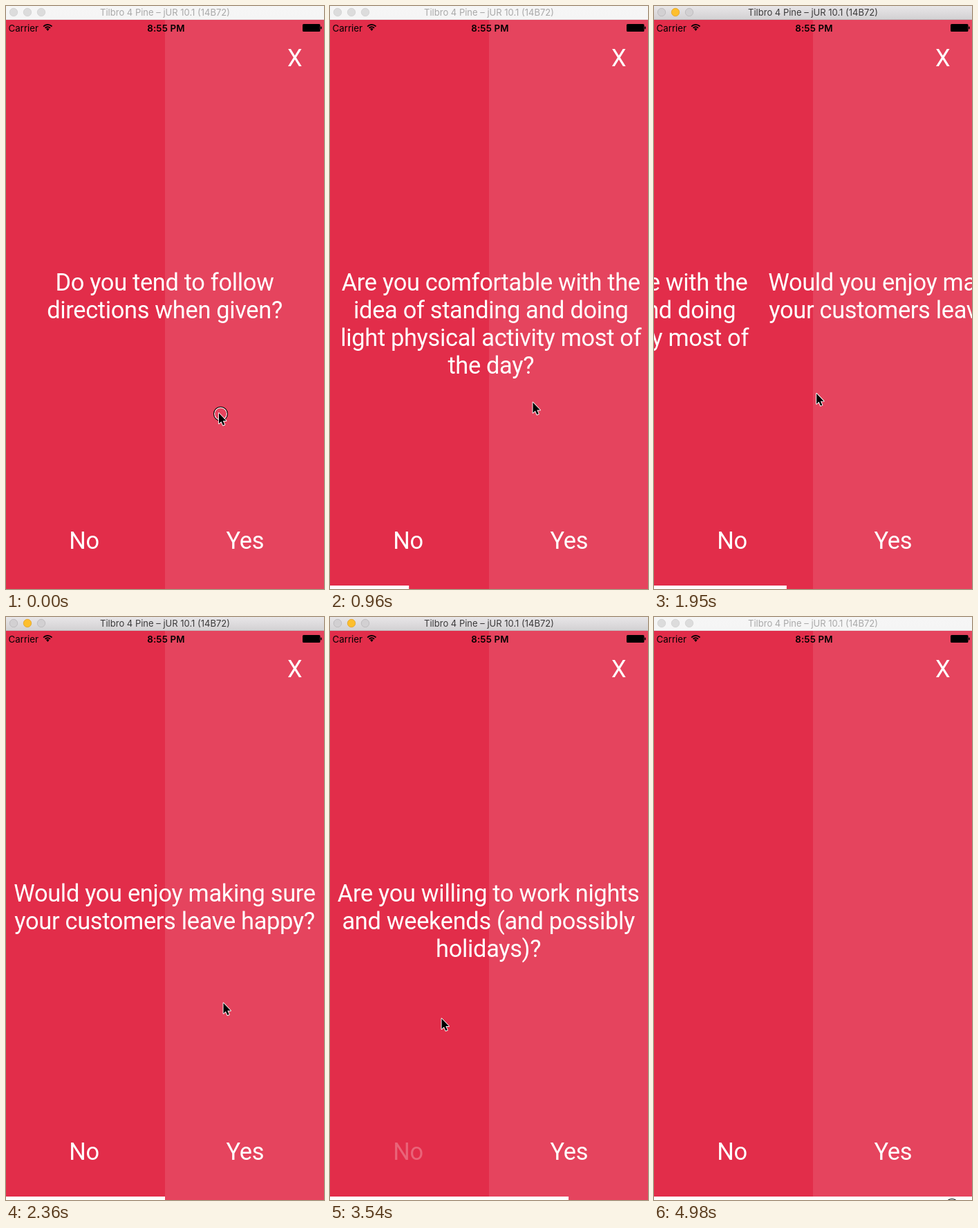
Animation, 460 px wide and 842 px high, one loop 5080 ms. Source, as an HTML page with a canvas:

```html
<!DOCTYPE html>
<html lang="en">
<head>
<meta charset="utf-8">
<title>Questionnaire</title>
<style>
html, body { margin: 0; width: 100%; height: 100%; overflow: hidden; }
canvas { display: block; }
</style>
</head>
<body>
<canvas id="stage" width="460" height="842"></canvas>
<script>
const ctx = document.getElementById('stage').getContext('2d');
const W = 460, H = 842, LOOP = 5080;
const BIG = '34.4px Roboto, sans-serif';
const PITCH = 464, SLIDE = 500;

const questions = [
  ['Do you tend to follow', 'directions when given?'],
  ['Are you comfortable with the', 'idea of standing and doing', 'light physical activity most of', 'the day?'],
  ['Would you enjoy making sure', 'your customers leave happy?'],
  ['Are you willing to work nights', 'and weekends (and possibly', 'holidays)?']
];

// Each answer: button, touch down, touch up (the slide starts on release).
const taps = [
  { label: 'Yes', down: 412, up: 490 },
  { label: 'No', down: 1530, up: 1650 },
  { label: 'Yes', down: 2600, up: 2600 },
  { label: 'No', down: 3530, up: 3530 }
];

const ACTIVE = [1530, 4980];
const rings = [[0, 60], [412, 510], [1530, 1645], [4980, LOOP]];

// Pointer path: time, x, y.
const path = [
  [0, 308, 588], [60, 308, 588], [324, 293.5, 572.5], [1010, 293.5, 572.5],
  [1480, 169.5, 561.5], [1760, 169.5, 561.5], [2180, 314.5, 557.5], [2780, 314.5, 557.5],
  [2950, 273.5, 569.5], [3240, 161.5, 580], [3890, 161.5, 580], [4060, 307, 625],
  [4600, 439, 850], [4979, 439, 850], [4980, 428.5, 849.5], [LOOP, 428.5, 849.5]
];

// The screen refreshes in bursts: first time, last time, number of updates.
const bursts = [
  [0, 0, 1], [60, 500, 6], [620, 960, 6], [1010, 1130, 3], [1190, 1600, 7],
  [1720, 2180, 9], [2360, 2360, 1], [2600, 2950, 7], [3010, 3070, 2],
  [3130, 3240, 3], [3540, 3890, 7], [3950, 4060, 3], [4120, 4600, 9], [4980, 4980, 1]
];

function refreshTime(t) {
  const [start, end, count] = bursts.filter(b => b[0] <= t).pop();
  if (t >= end) return end;
  const step = (end - start) / (count - 1);
  return start + Math.floor((t - start) / step) * step;
}

const clamp = v => Math.max(0, Math.min(1, v));
const within = (t, [a, b]) => t >= a && t < b;

// Cubic ease-in-out with control points (.42, 0) and (.58, 1).
function easeInOut(x) {
  if (x <= 0 || x >= 1) return clamp(x);
  let lo = 0, hi = 1, u;
  for (let i = 0; i < 24; i++) {
    u = (lo + hi) / 2;
    const bx = 3 * (1 - u) * u * (0.42 * (1 - u) + 0.58 * u) + u * u * u;
    if (bx < x) lo = u; else hi = u;
  }
  return u * u * (3 - 2 * u);
}

function pointerAt(t) {
  const i = Math.max(1, path.findIndex(p => p[0] > t));
  const [t0, x0, y0] = path[i - 1], [t1, x1, y1] = path[i];
  const k = (t - t0) / (t1 - t0);
  return [x0 + (x1 - x0) * k, y0 + (y1 - y0) * k];
}

function buttonAlpha(label, t) {
  const tap = taps.filter(p => p.label === label && t >= p.down).pop();
  return tap ? 0.2 + 0.8 * clamp((t - tap.up) / 130) : 1;
}

function rect(color, x, y, w, h) {
  ctx.fillStyle = color;
  ctx.fillRect(x, y, w, h);
}

function text(str, x, y, font, color, align = 'center', spacing = 0) {
  ctx.font = font;
  ctx.letterSpacing = spacing + 'px';
  ctx.textAlign = align;
  ctx.fillStyle = color;
  ctx.fillText(str, x, y);
}

const bigText = (str, x, y) => text(str, x, y, BIG, '#fff', 'center', -0.33);

function circle(x, y, r, fill, stroke, width = 1) {
  ctx.beginPath();
  ctx.arc(x, y, r, 0, Math.PI * 2);
  if (fill) { ctx.fillStyle = fill; ctx.fill(); }
  if (stroke) { ctx.strokeStyle = stroke; ctx.lineWidth = width; ctx.stroke(); }
}

function titleBar(active) {
  const fill = ctx.createLinearGradient(0, 0, 0, 20);
  fill.addColorStop(0, active ? '#e8e6e8' : '#f6f6f6');
  fill.addColorStop(1, active ? '#d2d0d2' : '#f5f5f5');
  rect(fill, 0, 0, W, 20);
  rect(active ? '#bdbbbd' : '#e4dfe0', 0, 19, W, 1);
  [11, 31, 51].forEach((x, i) => {
    if (active && i === 1) circle(x, 9, 5.7, '#fdbf2d', '#e0a32a', 0.8);
    else circle(x, 9, 5.7, active ? '#d2d0d2' : '#dcdcdc', active ? '#b9b7b9' : '#d0d0d0', 0.8);
  });
  text('Tilbro 4 Pine – jUR 10.1 (14B72)', 230, 14, '13px Inter, sans-serif', active ? '#3b3a3b' : '#a9a9a9');
}

function statusBar() {
  text('Carrier', 3.5, 36.5, '13.3px Inter, sans-serif', '#000', 'left');
  text('8:55 PM', 231.5, 36.5, '600 13.3px Inter, sans-serif', '#000', 'center', 0.2);
  ctx.strokeStyle = '#000';
  ctx.lineWidth = 1.9;
  for (const r of [5, 8.4]) {
    ctx.beginPath();
    ctx.arc(60.3, 35.3, r, -Math.PI * 0.76, -Math.PI * 0.24);
    ctx.stroke();
  }
  ctx.fillStyle = '#000';
  ctx.beginPath();
  ctx.moveTo(60.3, 36);
  ctx.arc(60.3, 35.3, 3, -Math.PI * 0.76, -Math.PI * 0.24);
  ctx.fill();
  ctx.beginPath();
  ctx.roundRect(429, 26, 25.5, 11, 1.5);
  ctx.roundRect(455, 29.5, 1.6, 4, 0.8);
  ctx.fill();
}

function pointer(x, y, ringed) {
  if (ringed) {
    circle(x + 2.5, y + 1, 9, null, '#fff', 1.3);
    circle(x + 2.5, y + 1, 10, null, '#000', 1.1);
  }
  const outline = [[0, 0], [0, 15], [3.4, 11.9], [5.9, 17.6], [8.3, 16.6], [5.8, 11], [10.5, 11]];
  ctx.beginPath();
  outline.forEach(([dx, dy]) => ctx.lineTo(x + dx, y + dy));
  ctx.closePath();
  ctx.lineJoin = 'round';
  ctx.lineWidth = 1.8;
  ctx.strokeStyle = '#fff';
  ctx.stroke();
  ctx.fillStyle = '#000';
  ctx.fill();
}

function draw(t) {
  rect('#e22d4a', 0, 0, 230, H);
  rect('#e5445e', 230, 0, 230, H);

  const answered = taps.reduce((sum, tap) => sum + easeInOut((t - tap.up) / SLIDE), 0);
  questions.forEach((lines, i) => {
    const x = 229.5 + (i - answered) * PITCH;
    if (Math.abs(x - 230) < W) lines.forEach((line, n) => bigText(line, x, 410.5 + 40 * n));
  });
  rect('#fff', 0, 837, answered * W / questions.length, 5);

  bigText('X', 417.5, 87);
  for (const [label, x] of [['No', 113], ['Yes', 345.8]]) {
    ctx.globalAlpha = buttonAlpha(label, t);
    bigText(label, x, 783.7);
  }
  ctx.globalAlpha = 1;

  titleBar(within(t, ACTIVE));
  statusBar();
  pointer(...pointerAt(t), rings.some(span => within(t, span)));
}

const began = performance.now();
function tick() {
  draw(refreshTime((performance.now() - began) % LOOP));
  requestAnimationFrame(tick);
}
tick();
</script>
</body>
</html>
```
